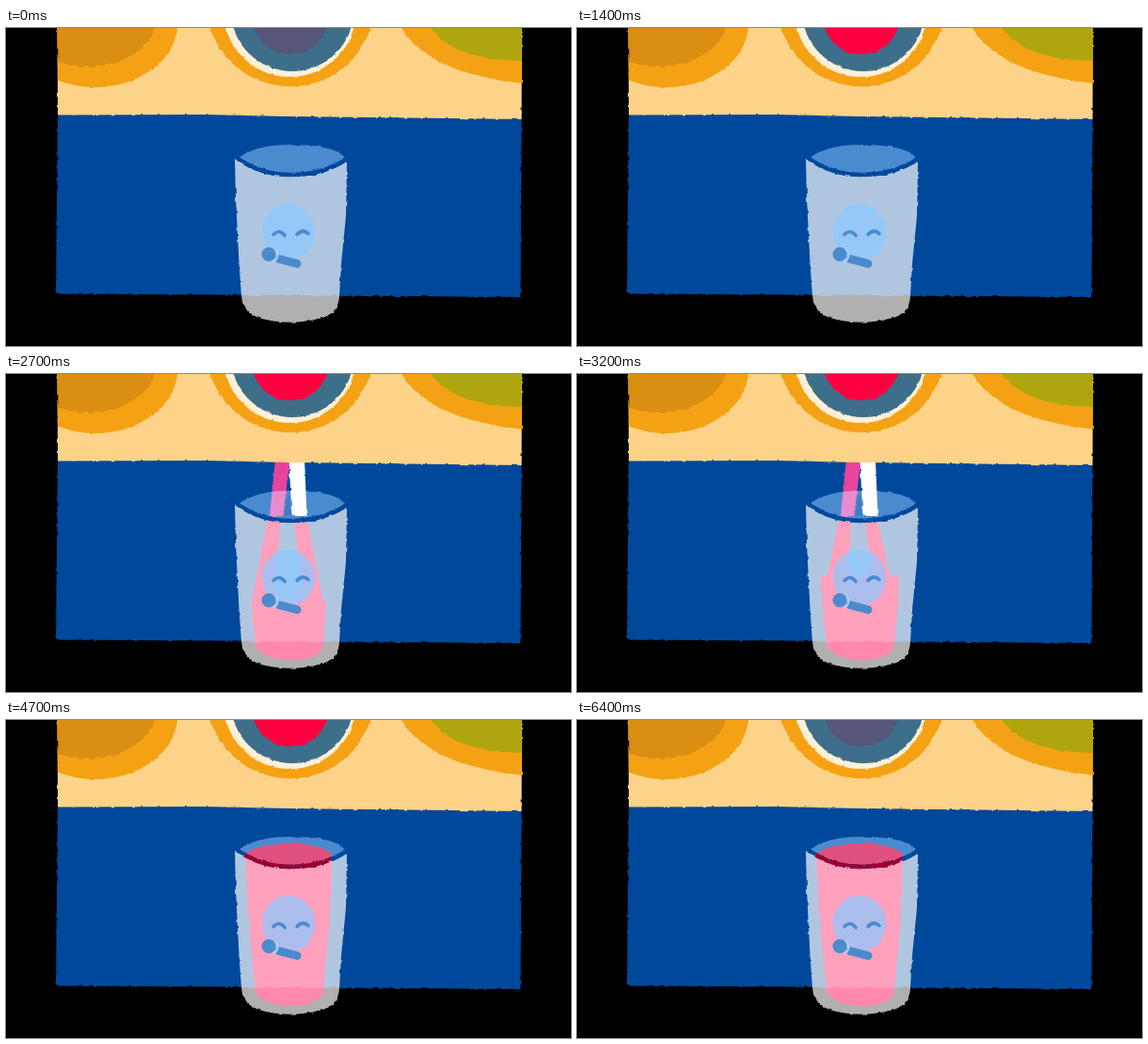
An HTML page for the animation above (6500 ms loop, 600 by 338 pixels).

```html
<!DOCTYPE html>
<html lang="en">
<head>
<meta charset="utf-8">
<title>Pouring a glass</title>
<style>
  html, body { margin: 0; width: 100%; height: 100%; overflow: hidden; background: #000; }
  svg { display: block; width: 100%; height: 100%; }
</style>
</head>
<body>
<svg viewBox="0 0 600 338">
  <defs>
    <filter id="rough" filterUnits="userSpaceOnUse" x="-20" y="-20" width="640" height="378" color-interpolation-filters="sRGB">
      <feTurbulence type="fractalNoise" baseFrequency="0.17" numOctaves="2" seed="4"/>
      <feDisplacementMap in="SourceGraphic" scale="3" xChannelSelector="R" yChannelSelector="G"/>
    </filter>
    <clipPath id="panelClip"><path d="M54.500-20H548L547.500 97 300 94 210 92 55 92.500Z"/></clipPath>
    <clipPath id="rimClip"><path id="rim" d="M247 139C258 128 280 124 303 124C330 124 352 128 360 138C345 150 325 156 303 156C285 156 265 152 247 139Z"/></clipPath>
    <clipPath id="bodyClip"><path d="M254 146Q278 158 303 159Q325 158 346 148L343 220 337.500 285Q336 303 303 304Q276 304 265 290L261 250 257 200Z"/></clipPath>
    <clipPath id="belowTable"><path d="M240 284.500H370V320H240Z"/></clipPath>
    <clipPath id="streamClip"><rect id="streamSpan" x="240" width="130"/></clipPath>
    <clipPath id="fillClip"><rect id="fillSpan" x="240" y="86" width="130"/></clipPath>
    <clipPath id="levelClip"><rect id="level" x="254" width="91.500" height="60"/></clipPath>
  </defs>

  <g filter="url(#rough)">
    <path fill="#00489c" d="M55 80H547.500L546.500 286 300 284 53 282.500Z"/>
    <use href="#rim" fill="#4a8bd0"/>
  </g>

  <g filter="url(#rough)">
    <g clip-path="url(#streamClip)">
      <path class="pink" fill="#e6449e"/>
      <g clip-path="url(#rimClip)">
        <path class="pink" fill="#e88ccf"/>
        <path id="shade" fill="#3f7cc4" d="M296 150Q295 136 302 127L305 150Z"/>
      </g>
      <path id="white" fill="#fff"/>
    </g>
    <g clip-path="url(#rimClip)">
      <ellipse clip-path="url(#levelClip)" cx="300" cy="147" rx="48" ry="16" fill="#e0507f"/>
    </g>
  </g>

  <g filter="url(#rough)">
    <g clip-path="url(#panelClip)">
      <path fill="#fdd389" d="M40-20H560V110H40Z"/>
      <ellipse cx="95" cy="-5" rx="87.300" ry="68" fill="#f4a214"/>
      <ellipse cx="87" cy="-10" rx="72" ry="51" fill="#da8e12"/>
      <path fill="#f4a214" d="M412-20L420 0Q448 50 560 60V-20Z"/>
      <path fill="#afa60f" d="M444-20L452 0Q475 36 560 35V-20Z"/>
      <circle cx="302" cy="-27" r="89.300" fill="#f4a214"/>
      <circle cx="301.500" cy="-18.500" r="70.500" fill="#fff0d8"/>
      <circle cx="304" cy="-19.500" r="65.500" fill="#3d6f8a"/>
      <circle cx="302" cy="-13" r="41" fill="#56567a"/>
      <circle id="glow" cx="302" cy="-13" r="41" fill="#ff0040"/>
    </g>
  </g>

  <g filter="url(#rough)">
    <path fill="#fff" fill-opacity=".69" d="M243 139C262 154 285 158 303 158C325 158 347 153 362 141L361 200 356 250 354 285Q353 303 336 308Q303 317 272 309Q252 304 250 285L247.500 250 244 180Z"/>
    <g clip-path="url(#bodyClip)">
      <g clip-path="url(#fillClip)">
        <path class="liquid" fill="#ffa0bd"/>
        <g clip-path="url(#belowTable)"><path class="liquid" fill="#ff88ab"/></g>
      </g>
    </g>
    <g fill="none" stroke-width="4.500">
      <path stroke="#00489c" d="M247 139C265 152 285 156 303 156C325 156 345 150 361 140"/>
      <path clip-path="url(#levelClip)" stroke="#9a0030" d="M247 139C265 152 285 156 303 156C325 156 345 150 361 140"/>
    </g>
    <ellipse cx="300" cy="216.500" rx="28" ry="30" fill="#8cc8ff" fill-opacity=".73"/>
  </g>

  <g fill="none" stroke="#4a8bce" stroke-width="3.600" stroke-linecap="round">
    <path d="M284 219.500Q290 213 296 220.500M309 219.500Q315 213 321 218.500"/>
    <path stroke-width="9" d="M290 245.500L309 250.500"/>
  </g>
  <circle cx="279" cy="240.500" r="7.500" fill="#4a8bce"/>
  <path fill="none" stroke="#a8d2fa" stroke-width="2" d="M286 235Q292 243 283.500 249"/>
</svg>
<script>
const LOOP = 6500;
const set = (selector, attrs) => document.querySelectorAll(selector).forEach(node => {
  for (const name in attrs) node.setAttribute(name, attrs[name]);
});

// Each track is a list of [time, value] steps with linear motion between them.
const tracks = {
  glow: [[0, 0], [1200, 1], [5100, 1], [6300, 0]],
  head: [[1400, 90], [2000, 297], [2100, 312]],
  tail: [[4350, 86], [4850, 158]],
  width: [[2050, 0], [2600, 1]],
  pool: [[2050, 312], [2700, 242], [3800, 185], [4300, 140]],
  surface: [[4000, 160], [4500, 130]]
};

function at(steps, t) {
  const next = steps.findIndex(step => step[0] > t);
  if (next === 0) return steps[0][1];
  if (next < 0) return steps[steps.length - 1][1];
  const [t0, a] = steps[next - 1], [t1, b] = steps[next];
  return a + (b - a) * (t - t0) / (t1 - t0);
}

const quad = (top, a, b, bottom, c, d) => `M${a} ${top}H${b}L${d} ${bottom}H${c}Z`;

// Two streams joined by a pool whose top dips between them.
function liquidPath(pool, w) {
  const [a, b, c, d] = [
    [280 - 3 * w, -0.1 - 0.09 * w], [290 + w, -0.087],
    [306, 0.13], [317 + 3 * w, 0.16 + 0.04 * w]
  ].map(([x, slope]) => y => x + (y - 158) * slope);
  const streams = quad(140, a(140), b(140), 310, a(310), b(310)) +
                  quad(140, c(140), d(140), 310, c(310), d(310));
  const wall = (pool - 150) * 0.07;
  const gaps = [[254 + wall, a(pool)], [b(pool), c(pool)], [d(pool), 346 - wall]];
  const dips = gaps.map(([from, to], i) => {
    const rise = Math.max(0, to - from) * 0.45;
    return `${i ? 'L' : 'M'}${from} ${pool - rise}Q${(from + to) / 2} ${pool + rise} ${to} ${pool - rise}`;
  });
  return streams + dips.join('') + 'V315H250Z';
}

function draw(t) {
  const now = {};
  for (const name in tracks) now[name] = at(tracks[name], t);
  const w = now.width;
  set('#glow', { opacity: now.glow });
  set('#streamSpan', { y: now.tail, height: now.head - now.tail });
  set('#fillSpan', { height: now.head - 86 });
  set('.pink', { d: quad(80, 291 - 4 * w, 303, 147 + 4 * w, 281 - w, 292 + 2 * w) });
  set('#white', { d: quad(80, 300, 313.5 + 3 * w, 147 + 4 * w, 303.5, 316.5 + 3 * w) });
  set('#shade', { opacity: w * (now.tail < 120) });
  set('.liquid', { d: liquidPath(now.pool, w) });
  set('#level', { y: now.surface });
}

function tick() {
  draw(performance.now() % LOOP);
  requestAnimationFrame(tick);
}
tick();
</script>
</body>
</html>
```
